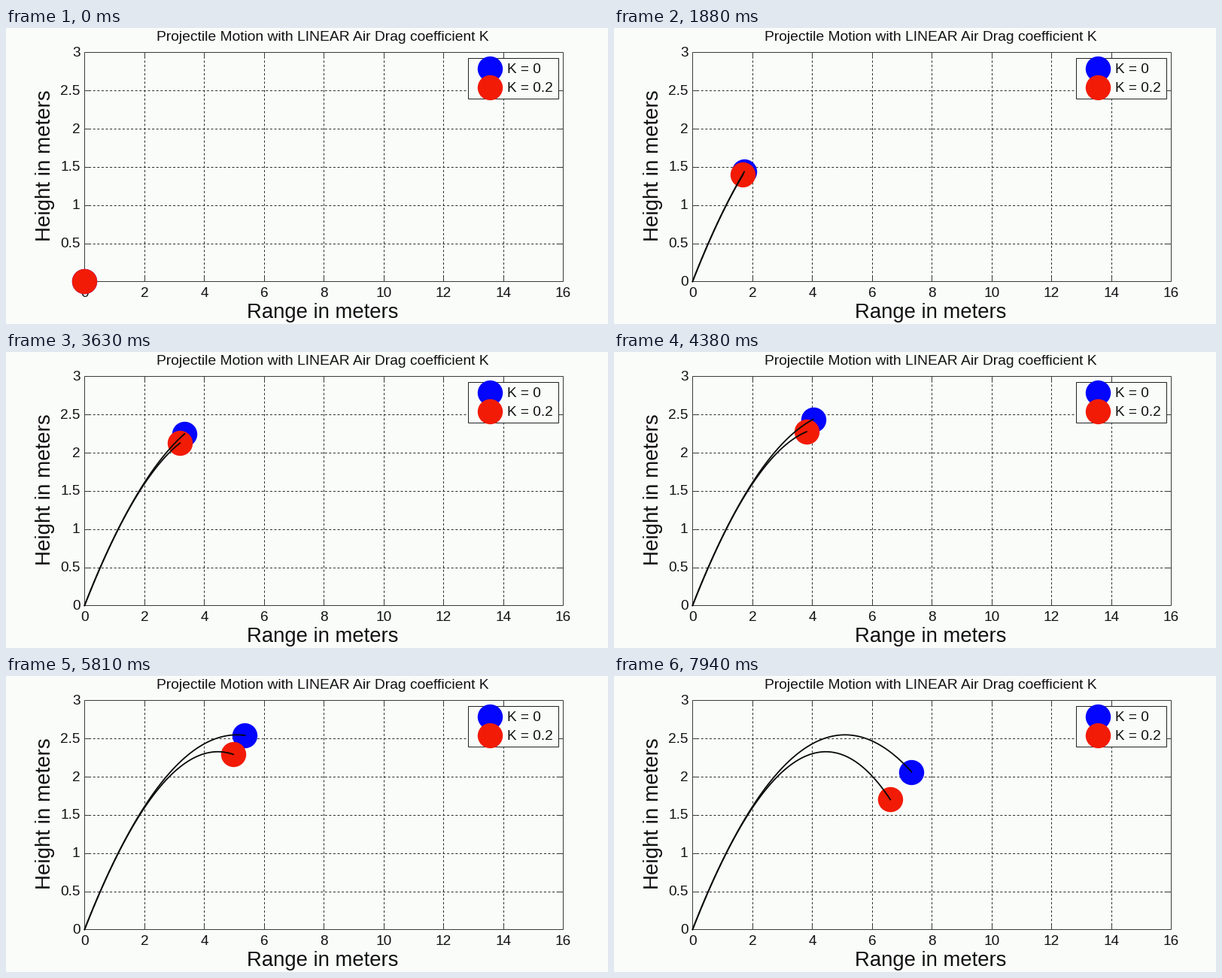
These frames come from a looping animation (800x394 px, 8 s). A matplotlib script:

```python
import numpy as np
import matplotlib.pyplot as plt
from matplotlib.animation import FuncAnimation
from matplotlib.patches import Rectangle

W, H, DPI = 800, 394, 64
PT = 72 / DPI                      # points per pixel
INTERVAL, FRAMES = 25, 320
STEPS_PER_SECOND = 16              # the balls move in discrete steps

LEFT, RIGHT, TOP, BOTTOM = 104.4, 740.4, 32.4, 337.4
X_MAX, Y_MAX = 16, 3
SPEED, ANGLE, G, K = 10, np.pi / 4, 9.81, 0.2
RATE = 0.1304                      # flight seconds per second shown

PAPER, INK, BLUE, RED = "#fafcfa", "#111111", "#0305fc", "#f21b06"

plt.rcParams["font.family"] = "Liberation Sans"
fig = plt.figure(figsize=(W / DPI, H / DPI), dpi=DPI, facecolor=PAPER)
ax = fig.add_axes([0, 0, 1, 1])
ax.set(xlim=(0, W), ylim=(H, 0))
ax.axis("off")


def px(x):
    return LEFT + x * (RIGHT - LEFT) / X_MAX


def py(y):
    return BOTTOM - y * (BOTTOM - TOP) / Y_MAX


def line(xs, ys, width=1.0, **kw):
    return ax.plot(xs, ys, lw=width * PT, color=kw.pop("color", INK), **kw)[0]


def label(x, y, text, size=19, ha="center", **kw):
    ax.text(x, y, text, size=size * PT, ha=ha, va="baseline", color=INK, **kw)


def ball(x, y, color, z):
    return ax.plot([x], [y], "o", ms=33.4 * PT, mfc=color, mec="none",
                   zorder=z, snap=False)[0]


def draw_axes():
    dash = dict(color="#2c2c2c", ls=(0, (3, 2.6)), zorder=1)
    edge = dict(color="#3a3a3a", zorder=1.5)
    for v in range(0, X_MAX + 1, 2):
        x = px(v)
        if 0 < v < X_MAX:
            line([x, x], [BOTTOM, TOP], **dash)
            line([x, x], [BOTTOM, BOTTOM - 6], **edge)
            line([x, x], [TOP, TOP + 6], **edge)
        label(x, 358, str(v))
    for v in np.arange(0, Y_MAX + 0.1, 0.5):
        y = py(v)
        if 0 < v < Y_MAX:
            line([LEFT, RIGHT], [y, y], **dash)
            line([LEFT, LEFT + 6], [y, y], **edge)
            line([RIGHT, RIGHT - 6], [y, y], **edge)
        label(98.5, y + 5.6, f"{v:g}", ha="right")
    ax.add_patch(Rectangle((LEFT, TOP), RIGHT - LEFT, BOTTOM - TOP, fill=False,
                           ec=edge["color"], lw=PT, zorder=1.5))
    label(421, 17.2, "Projectile Motion with LINEAR Air Drag coefficient K", 19.25)
    label(421, 386.4, "Range in meters", 27.5)
    label(59, 183.4, "Height in meters", 27.7, rotation=90, rotation_mode="anchor")


def draw_legend():
    ax.add_patch(Rectangle((614.2, 40), 120.2, 54.4, fc=PAPER, ec="#222222",
                           lw=PT, zorder=7))
    for y, color, text in ((54.2, BLUE, "K = 0"), (79.2, RED, "K = 0.2")):
        ball(642.8, y, color, 8)
        label(666.5, y + 6.2, text, ha="left", zorder=8)


def flight(t, k):
    """Position in meters under linear drag k."""
    vx, vy = SPEED * np.cos(ANGLE), SPEED * np.sin(ANGLE)
    if k == 0:
        return vx * t, vy * t - G * t**2 / 2
    decay = (1 - np.exp(-k * t)) / k
    return vx * decay, (vy + G / k) * decay - G * t / k


draw_axes()
draw_legend()
balls = [ball(LEFT, BOTTOM, BLUE, 4), ball(LEFT, BOTTOM, RED, 5)]
trails = [line([], [], 1.8, color="#080808", zorder=6) for _ in balls]


def update(i):
    step = (2 * i + 1) // 5        # two steps every five frames
    t = np.linspace(0, RATE * step / STEPS_PER_SECOND, 60)
    for k, dot, trail in zip((0, K), balls, trails):
        x, y = flight(t, k)
        x, y = px(x), py(y)
        trail.set_data(x, y)
        dot.set_data(x[-1:], y[-1:])
    return balls + trails


anim = FuncAnimation(fig, update, frames=FRAMES, interval=INTERVAL,
                     init_func=lambda: update(0), repeat=True, repeat_delay=0)
plt.show()
```
